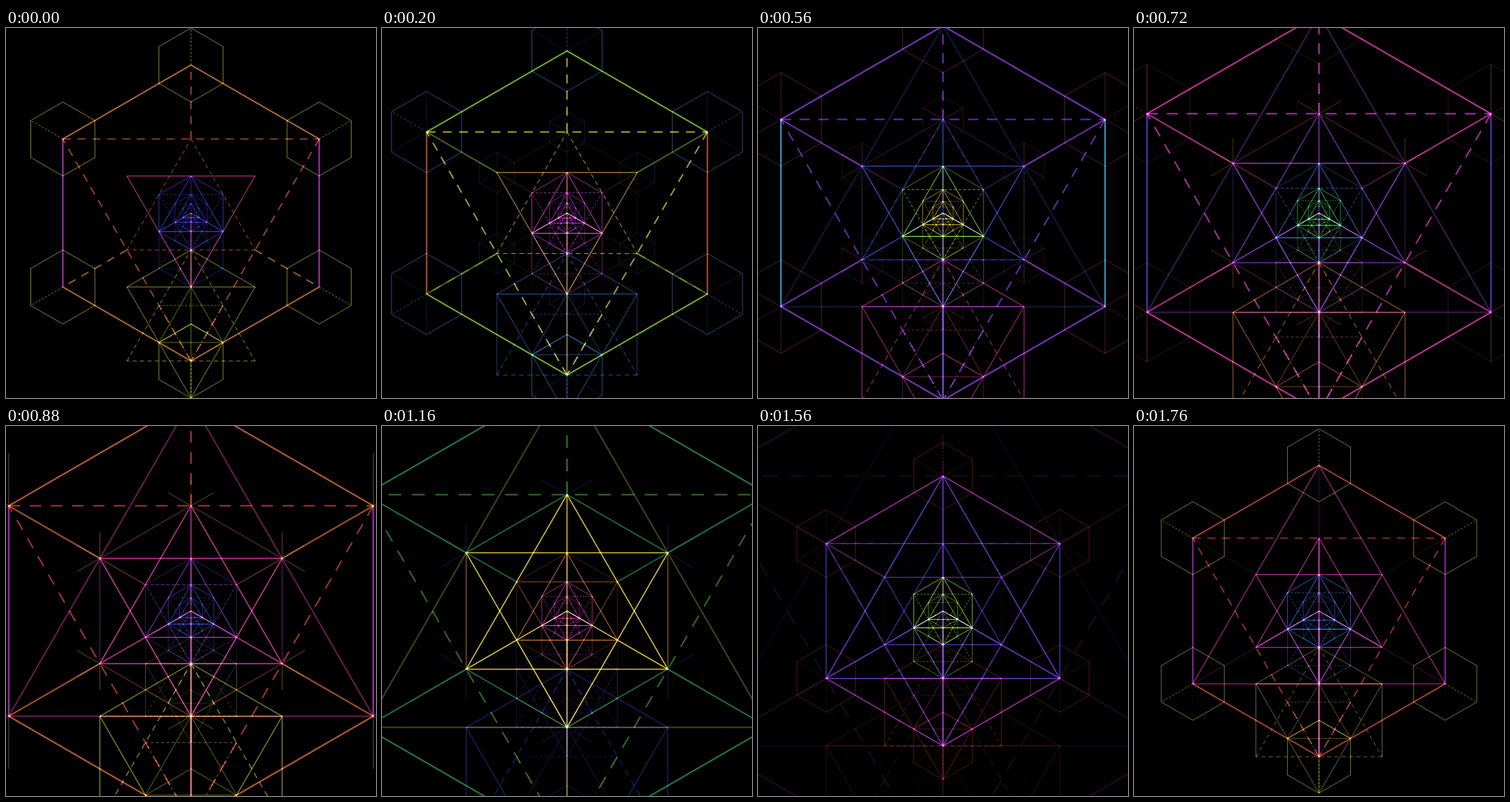
Recreate the animation shown at these times as an HTML page with a canvas. Size 500 by 500 pixels, loop 1.8 s.

```html
<!DOCTYPE html>
<html>
<head>
<meta charset="utf-8">
<style>
html, body { margin: 0; width: 100%; height: 100%; overflow: hidden; background: #000; }
canvas { display: block; width: 500px; height: 500px; }
</style>
</head>
<body>
<canvas id="stage" width="500" height="500"></canvas>
<script>
const ctx = document.getElementById('stage').getContext('2d');
const LOOP = 1800, STEP = 40;

// Evenly spaced key hues of one colour cycle, which runs twice per loop
const HUES = [65, 195, 255, 284, 335, 395, 425];
const STAR = .64, SLANT = .81, SIDE = .55, DASH = .77, CUBE = 0;

let t = 0;

const clamp = (x, lo, hi) => Math.min(Math.max(x, lo), hi);
const ramp = (x, a, b) => clamp((x - a) / (b - a), 0, 1);
const pulse = (x, a, b, c, d) => ramp(x, a, b) * (1 - ramp(x, c, d));

function hue(phase) {
  const x = (phase + 2 * t + 2) % 1 * (HUES.length - 1), i = Math.floor(x);
  return HUES[i] + (HUES[i + 1] - HUES[i]) * (x - i);
}

// Hexagon corner i, counted clockwise from the top
function corner(i, r, x = 0, y = 0) {
  const a = i * Math.PI / 3;
  return [x + r * Math.sin(a), y - r * Math.cos(a)];
}

function path(points, phase, alpha, size, dashed) {
  if (alpha < .01) return;
  ctx.globalAlpha = Math.min(alpha, 1);
  ctx.strokeStyle = `hsl(${hue(phase)}, 80%, 58%)`;
  ctx.lineWidth = clamp(size / 120, .9, 2);
  ctx.setLineDash(dashed ? [size * .055, size * .045] : []);
  ctx.beginPath();
  points.forEach(p => ctx.lineTo(...p));
  ctx.stroke();
}

const ring = (ids, r, x, y) => ids.map(i => corner(i, r, x, y));
const hexagon = (r, x, y) => ring([0, 1, 2, 3, 4, 5, 0], r, x, y);

function triangle(first, r, y, phase, alpha, dashed) {
  for (let i = first; i < first + 6; i += 2) {
    path(ring([i, i + 2], r, 0, y), phase, alpha, r, dashed);
  }
}

// Lines along the radii, from a fraction of the radius outwards
function spokes(ids, from, r, y, phase, alpha, dashed) {
  ids.forEach(i => path([corner(i, r * from, 0, y), corner(i, r, 0, y)], phase, alpha, r, dashed));
}

function cubes(r, outline, arm) {
  const s = r / 4;
  for (let i = 0; i < 6; i++) {
    const c = corner(i, r);
    path(hexagon(s, ...c), CUBE, outline, s);
    path([c, corner(i, s, ...c)], CUBE, Math.max(outline, arm), s, true);
    [i - 1, i + 1].forEach(j => path([c, corner(j, s, ...c)], CUBE, arm, s));
  }
}

// Star with a half-size star in it, hanging below the centre
function lowStar(r, alpha) {
  const y = r * .75, s = r / 2;
  const rim = alpha * ramp(t, 0, .15);
  triangle(1, s, y, CUBE, alpha);
  triangle(0, s, y, CUBE, alpha, true);
  path(ring([5, 0, 1], s, 0, y), CUBE, alpha, s);
  path(ring([1, 2], s, 0, y), CUBE, rim, s);
  path(ring([4, 5], s, 0, y), CUBE, rim, s);
  triangle(0, s / 2, y, CUBE, alpha * .8);
  triangle(1, s / 2, y, CUBE, alpha * .8, true);
  spokes([0, 3], 0, s, y, CUBE, alpha * .8);
  spokes([2, 4], 0, s / 2, y, CUBE, alpha * .8);
}

// Opacities follow the octave: 0 at radius 100, 1 at 200, 2 at 400
function level(r) {
  const oct = Math.log2(r / 100);
  const inner = oct < 0, outer = oct >= 1;
  const fade = inner ? 1 - .3 * ramp(-oct, 1, 2) : 1 - ramp(oct, 1.5, 1.95);
  const main = STAR + .35 * clamp(oct, -1, 0);
  const slant = inner ? main : SLANT, dash = inner ? main : DASH;

  const hex = Math.min(1, Math.abs(oct)) * .8 * fade;
  const down = pulse(oct, -.6, -.15, .8, .95);
  const up = fade * (1 - .55 * ramp(oct, .8, 1)) * (inner ? 1 : ramp(oct % 1, .15, .5));

  for (let i = 0; i < 6; i++) {
    path(ring([i, i + 1], r), i % 3 === 1 && !inner ? SIDE : slant, hex, r);
  }
  triangle(5, r, 0, dash, .7 * fade - down, true);
  triangle(0, r, 0, dash, .8 * (1 - ramp(oct, .7, .95)) - up, true);
  triangle(5, r, 0, main, down);
  triangle(0, r, 0, main, up);

  if (inner) {
    spokes([0, 2, 3, 4], .5, r, 0, main, .7 * fade);
    path(hexagon(r, 0, r), main, hex * .6, r);
    triangle(0, r, r, main, hex * .6, true);
    triangle(1, r, r, main, hex * .4);
    return;
  }

  const ray = outer ? .7 * fade * ramp(oct, 1, 1.2) : .5 * pulse(oct, 0, .3, .85, 1);
  const outline = Math.max(.6 * pulse(oct, .7, 1, 1.25, 1.5), .2 * pulse(oct, 0, .1, .3, .5));
  lowStar(r, outer ? .65 * fade : .5 * oct);
  cubes(r, outline, .4 * fade * Math.abs(Math.sin(Math.PI * oct)));
  spokes([1, 5], .5, r, 0, SLANT, ray);

  if (outer) {
    spokes([2, 4], .5, r, 0, SLANT, ray);
    spokes([2, 4], .5, r, 0, SLANT, .7 * fade - ray, true);
    spokes([0], .5, r, 0, DASH, .7 * fade, true);
    spokes([3], .5, r, 0, STAR, ray);
  } else {
    spokes([0, 2, 4], 0, r / 2, 0, STAR, ramp(oct, 0, .2));
    spokes([0, 2, 4], .5, r, 0, STAR, pulse(oct, .1, .35, .85, 1));
    spokes([3], 0, r, 0, STAR, .9);
  }
}

function draw(now) {
  t = Math.floor(now % LOOP / STEP) * STEP / LOOP;
  const size = 200 * (1 + t - t * (1 - t) * (.13 + .28 * t));
  ctx.setTransform(1, 0, 0, 1, 0, 0);
  ctx.globalCompositeOperation = 'source-over';
  ctx.globalAlpha = 1;
  ctx.fillStyle = '#000';
  ctx.fillRect(0, 0, 500, 500);
  ctx.translate(250, 250);
  ctx.globalCompositeOperation = 'lighter';
  for (let k = 0; k < 5; k++) level(size / 2 ** k);
}

const start = performance.now();
function tick() {
  draw(performance.now() - start);
  requestAnimationFrame(tick);
}
tick();
</script>
</body>
</html>
```
